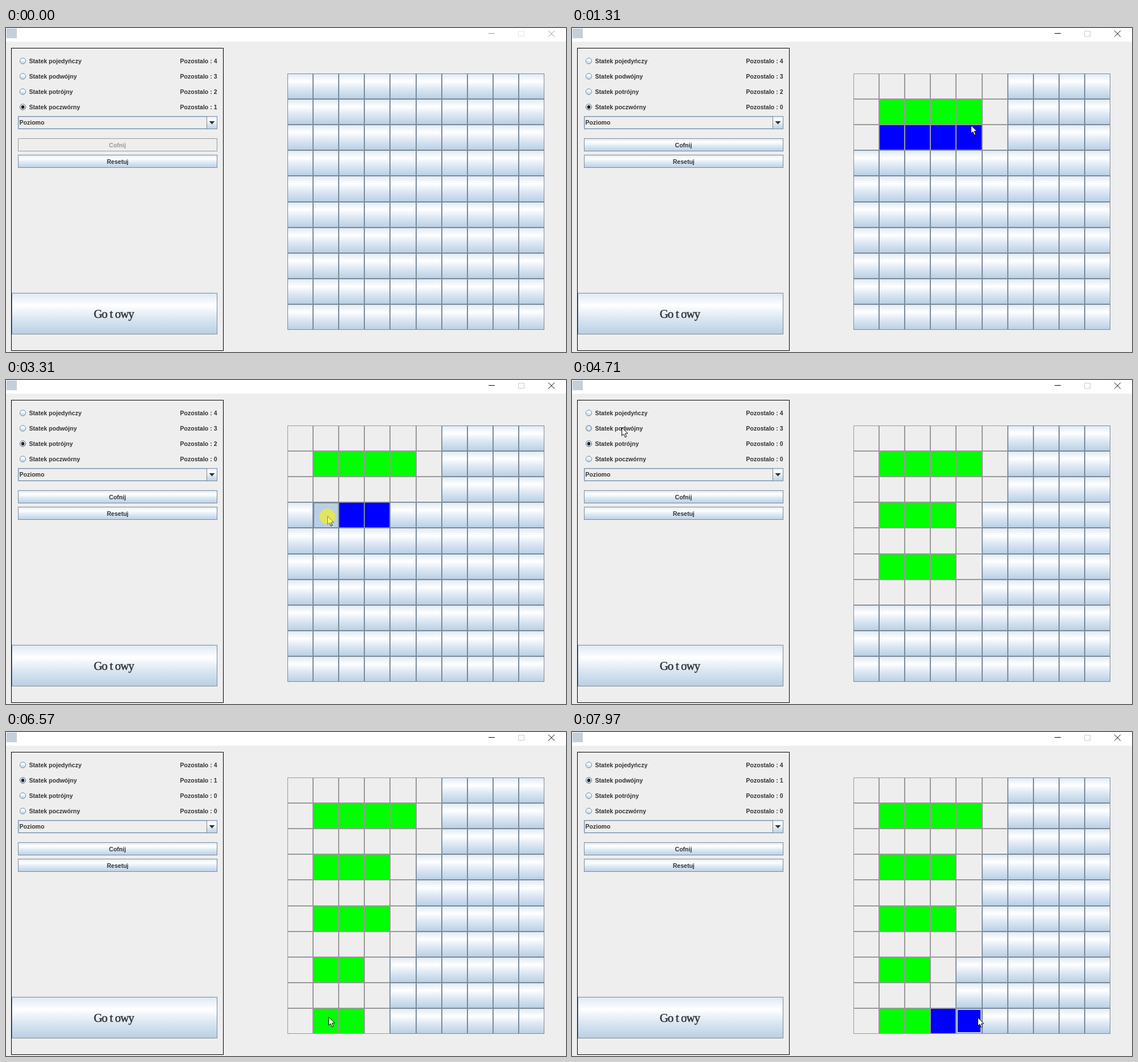
An HTML page with a canvas that plays this animation: 983x570 px, repeating every 8000 ms.

```html
<!DOCTYPE html>
<html lang="pl">
<head>
<meta charset="utf-8">
<style>
html, body { margin: 0; width: 100%; height: 100%; overflow: hidden; background: #eee; }
canvas { display: block; }
</style>
</head>
<body>
<canvas id="stage" width="983" height="570"></canvas>
<script>
const g = document.getElementById('stage').getContext('2d');
const LOOP = 8000, STEP = 77.3;
const X0 = 494, Y0 = 80, CELL = 45.1;
const EDGE = '#7a8a99', OFF = '#999', BG = '#eee', INK = '#333', SOFT = '#b8cfe5';
const FONT = 'bold 10.55px "Liberation Sans", Arial, sans-serif';
const NAMES = ['pojedyńczy', 'podwójny', 'potrójny', 'poczwórny'];

// mouse clicks; those with "pick" choose a ship size, the others place a ship
const CLICKS = [
  { down: 1010, up: 1085, size: 4 },
  { down: 2310, up: 2460, size: 3, pick: true },
  { down: 3300, up: 3385, size: 3 },
  { down: 4010, up: 4080, size: 3 },
  { down: 4790, up: 4865, size: 2, pick: true },
  { down: 5550, up: 5630, size: 2 },
  { down: 6410, up: 6560, size: 2 }
];
// pointer moves: begin, end, target x, target y, vertical bend
const START = [825, 531];
const MOVES = [
  [150, 930, 700, 152], [1160, 1310, 700, 170.5], [1310, 2080, 101, 107, 150],
  [2470, 2850, 740, 242], [2870, 3160, 564, 239], [3390, 3850, 554, 327],
  [4200, 4640, 87, 83, -80], [4940, 5480, 565, 424, -150], [5880, 6250, 566, 501],
  [6570, 6950, 250, 205], [7000, 7350, 520, 190], [7350, 7730, 687, 499], [7830, 7960, 712, 502]
];

function pointerAt(t) {
  if (t < MOVES[0][0]) return null;
  let [x, y] = START;
  for (const [begin, end, tx, ty, bend = 0] of MOVES) {
    if (t < begin) break;
    const u = Math.min(1, (t - begin) / (end - begin)), f = u * u * (3 - 2 * u);
    x += (tx - x) * f;
    y += (ty - y) * f + bend * Math.sin(Math.PI * f) * (1 - f);
  }
  return [x, y];
}

function fill(x, y, w, h, color) { g.fillStyle = color; g.fillRect(x, y, w, h); }
function frame(x, y, w, h, color) {
  g.strokeStyle = color; g.lineWidth = 1;
  g.strokeRect(x + .5, y + .5, w - 1, h - 1);
}
function text(s, x, y, color = INK, align = 'left') {
  g.fillStyle = color; g.textAlign = align;
  g.fillText(s, x, y);
}
function gloss(y, h) {
  const l = g.createLinearGradient(0, y, 0, y + h);
  [[0, '#dde8f3'], [.3, '#fff'], [.6, '#dde8f3'], [1, SOFT]].forEach(s => l.addColorStop(...s));
  return l;
}
function button(x, y, w, h, hot) {
  fill(x, y, w, h, gloss(y, h));
  frame(x, y, w, h, EDGE);
  if (hot) for (const m of [1, 2]) frame(x + m, y + m, w - 2 * m, h - 2 * m, SOFT);
}
function line(color, x1, y1, x2, y2) {
  g.strokeStyle = color; g.lineWidth = 1;
  g.beginPath(); g.moveTo(x1, y1); g.lineTo(x2, y2); g.stroke();
}
function disc(x, y, r, color) {
  g.beginPath(); g.arc(x, y, r, 0, 7);
  g.fillStyle = color; g.fill();
}
function ring(x, y, r, color, width = 1) {
  g.beginPath(); g.arc(x, y, r, 0, 7);
  g.strokeStyle = color; g.lineWidth = width; g.stroke();
}

function titleBar(active) {
  fill(0, 0, 983, 24, '#fff');
  fill(1, 1, 18, 17, '#c3cfda');
  const c = active ? '#000' : '#999';
  line(c, 847, 9.5, 858, 9.5);
  frame(899, 5, 11, 10, active ? '#ccc' : '#e6e6e6');
  line(c, 952, 4.5, 963, 15.5);
  line(c, 963, 4.5, 952, 15.5);
}

function radio(y, on, hot, down) {
  disc(29.5, y, 5.2, hot && down ? SOFT : gloss(y - 5, 10));
  if (hot) ring(29.5, y, 3.8, SOFT, 2);
  ring(29.5, y, 5.1, on ? '#5a6773' : EDGE);
  if (on) disc(29.5, y, 2.9, '#222');
}

function panel(p, down, size, focus, ships) {
  const inside = (x, y, w, h) => p && p[0] >= x && p[0] < x + w && p[1] >= y && p[1] < y + h;
  frame(9, 35, 373, 533, '#000');
  g.font = FONT;
  NAMES.forEach((name, i) => {
    const y = 58 + 27 * i, label = 'Statek ' + name, w = g.measureText(label).width;
    radio(y, i + 1 === size, inside(21, y - 11, w + 22, 22), down);
    text(label, 40.5, y + 4);
    if (i + 1 === focus) frame(39, y - 8, Math.round(w) + 3, 16, '#a9bfd5');
    const left = 4 - i - ships.filter(s => s.size === i + 1).length;
    text('Pozostalo : ' + left, 370.5, y + 4, INK, 'right');
  });

  frame(21, 155, 350, 23, EDGE);
  frame(22, 156, 331, 21, SOFT);
  button(352, 155, 19, 23);
  text('Poziomo', 23.5, 170);
  g.fillStyle = INK;
  g.beginPath(); g.moveTo(356.5, 164); g.lineTo(366.5, 164); g.lineTo(361.5, 169.5); g.fill();

  const undo = ships.length > 0;
  if (undo) button(21, 194, 350, 23, inside(21, 194, 350, 23));
  else frame(21, 194, 350, 23, OFF);
  text('Cofnij', 195.7, 210, undo ? INK : OFF, 'center');
  button(21, 223, 350, 23, inside(21, 223, 350, 23));
  text('Resetuj', 196, 239, INK, 'center');

  button(10, 466, 361, 73);
  g.font = '21px "Liberation Serif", "Times New Roman", serif';
  g.strokeStyle = INK; g.lineWidth = .5;
  [...'Gotowy'].forEach((ch, i) => {
    const x = 161.5 + 11.7 * i;
    text(ch, x, 510, INK, 'center');
    g.strokeText(ch, x, 510);
  });
}

function board(p, down, n, ships) {
  const [c, r] = p ? [Math.floor((p[0] - X0) / CELL), Math.floor((p[1] - Y0) / CELL)] : [-1, -1];
  const over = c >= 0 && c < 10 && r >= 0 && r < 10;
  const first = c >= n ? c - n + 1 : c;
  const isShip = (x, y) => ships.some(s => s.row === y && x >= 1 && x <= s.size);
  const blocked = (x, y) => ships.some(s => Math.abs(s.row - y) < 2 && x <= s.size + 1);
  let preview = over;
  for (let i = 0; i < n; i++) if (isShip(first + i, r)) preview = false;

  for (let y = 0; y < 10; y++) for (let x = 0; x < 10; x++) {
    const px = X0 + Math.round(x * CELL), py = Y0 + Math.round(y * CELL);
    const w = X0 + Math.round((x + 1) * CELL) - px, h = Y0 + Math.round((y + 1) * CELL) - py;
    const off = blocked(x, y), hot = over && x === c && y === r && !off;
    const blue = preview && y === r && x >= first && x < first + n;
    if (off) fill(px, py, w, h, isShip(x, y) ? '#0f0' : BG);
    else button(px, py, w, h, hot);
    if (hot && down) {
      fill(px, py, w, h, SOFT);
      line(EDGE, px, py + 1.5, px + w, py + 1.5);
      line(EDGE, px + 1.5, py, px + 1.5, py + h);
    } else if (blue) {
      const m = hot ? 3 : 1;
      fill(px + m, py + m, w - 2 * m, h - 2 * m, '#00f');
    }
    frame(px, py, w, h, off ? OFF : EDGE);
  }
}

function pointer([x, y], down) {
  g.save();
  g.translate(x + .5, y + .5);
  g.beginPath();
  [[0, 0], [0, 14.5], [3.3, 11.5], [5.8, 17.3], [8.2, 16.3], [5.8, 10.7], [10.3, 10.5]]
    .forEach(q => g.lineTo(...q));
  g.closePath();
  g.fillStyle = '#fff'; g.fill();
  g.strokeStyle = '#000'; g.lineWidth = 1; g.stroke();
  g.restore();
  if (down) disc(x, y + 1, 14, 'rgba(255,245,0,.58)');
}

function draw(now) {
  const t = now % LOOP;
  const p = pointerAt(Math.floor(t / STEP + .2) * STEP);
  const begun = CLICKS.filter(k => t >= k.down), done = begun.filter(k => t >= k.up);
  const last = begun[begun.length - 1], down = begun.length > done.length;
  const picked = done.filter(k => k.pick).pop();
  const size = picked ? picked.size : 4;
  const ships = done.filter(k => !k.pick).map((k, i) => ({ row: 2 * i + 1, size: k.size }));
  fill(0, 0, 983, 570, BG);
  titleBar(begun.length > 0);
  panel(p, down, size, last && last.pick ? last.size : 0, ships);
  board(p, down, size, ships);
  if (p) pointer(p, down);
}

const start = performance.now();
function tick() {
  draw(performance.now() - start);
  requestAnimationFrame(tick);
}
tick();
</script>
</body>
</html>
```
